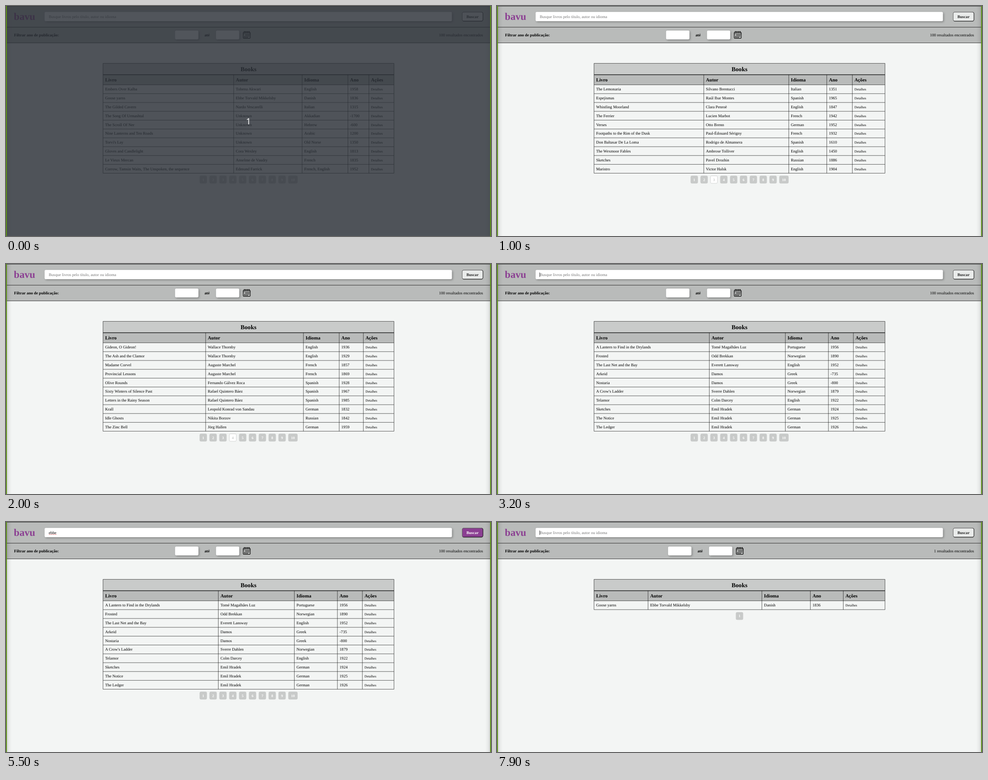
These frames come from a looping animation (1086 by 515 pixels, 8000 ms). An HTML page:

```html
<!DOCTYPE html>
<html lang="pt">
<head>
<meta charset="utf-8">
<title>Books</title>
<style>
  html, body { margin: 0; width: 100%; height: 100%; overflow: hidden; background: #f3f5f4; }
  svg { display: block; width: 1086px; height: 515px; }
  text { font-family: "Liberation Serif", "Times New Roman", serif; text-rendering: geometricPrecision; white-space: pre; }
  .field { fill: #fff; filter: drop-shadow(2.5px 2.5px 2.2px rgba(0, 0, 0, .28)); }
</style>
</head>
<body>
<svg id="stage" viewBox="0 0 1086 515"></svg>
<script>
const LOOP = 8000, TICK = 100;
const EM = 16 * 1086 / 1920;          // body text size on the stage
const ROW = 35 * 1086 / 1920, ROWS_TOP = 176.45;
const LEFT = 217.2, RIGHT = 868.8, PAD = 4.75;
const QUERY = 'ebbe';

// Each page: inner column lines, then rows of title|author|language|year
const pages = [
  { at: 0, cols: [509.8, 663.1, 765.6, 812.6], rows: `Embers Over Kalba|Tobenu Akwari|English|1958
Goose yarns|Ebbe Torvald Mikkelsby|Danish|1836
The Gilded Cavern|Nardo Vescarelli|Italian|1315
The Song Of Urmashtal|Unknown|Akkadian|-1700
The Scroll Of Ner|Unknown|Hebrew|-600
Nine Lanterns and Ten Roads|Unknown|Arabic|1200
Torvi's Lay|Unknown|Old Norse|1350
Gloves and Candlelight|Cora Wexley|English|1813
Le Vieux Mercan|Anselme de Vaudry|French|1835
Corrow, Tamsin Waits, The Unspoken, the sequence|Edmund Farrick|French, English|1952` },
  { at: 700, cols: [463, 653.3, 738.4, 795.7], rows: `The Lemonaria|Silvano Brentucci|Italian|1351
Espejismas|Raúl Ibar Montes|Spanish|1965
Whistling Moorland|Clara Penroë|English|1847
The Ferrier|Lucien Marbot|French|1942
Verses|Otto Brenn|German|1952
Footpaths to the Rim of the Dusk|Paul-Édouard Sérigny|French|1932
Don Baltasar De La Loma|Rodrigo de Almansera|Spanish|1610
The Wexmoor Fables|Ambrose Tolliver|English|1450
Sketches|Pavel Drozhin|Russian|1886
Maristro|Victor Halsk|English|1904` },
  { at: 1600, cols: [447, 640, 734, 795], rows: `Modest Fortunes|Arthur Pellwick|English|1861
Lucas the Doubter|Étienne Rovard|French|1796
Hamburg Lindenhof|Ulrich Dornach|German|1929
Guilt and Winter|Grigori Volnin|Russian|1866
The Hermit of Orsk|Grigori Volnin|Russian|1869
The Restless Ones|Grigori Volnin|Russian|1872
The Sisters Malinova|Grigori Volnin|Russian|1880
Fennimarsh|Georgia Elwin|English|1871
Unseen Neighbour|Randall Eames|English|1952
Calyra|Eurastes|Greek|-431` },
  { at: 2000, cols: [447, 666, 746.1, 800.2], rows: `Gideon, O Gideon!|Wallace Thornby|English|1936
The Ash and the Clamor|Wallace Thornby|English|1929
Madame Corvel|Auguste Marchel|French|1857
Provincial Lessons|Auguste Marchel|French|1869
Olive Rounds|Fernando Gálvez Roca|Spanish|1928
Sixty Winters of Silence Past|Rafael Quintero Báez|Spanish|1967
Letters in the Rainy Season|Rafael Quintero Báez|Spanish|1985
Krall|Leopold Konrad von Sandau|German|1832
Idle Ghosts|Nikita Borzov|Russian|1842
The Zinc Bell|Jörg Hallen|German|1959` },
  { at: 2500, cols: [475.4, 645.7, 742.1, 798], rows: `A Lantern to Find in the Drylands|Tomé Magalhães Luz|Portuguese|1956
Frosted|Odd Brekkan|Norwegian|1890
The Last Net and the Bay|Everett Lansway|English|1952
Arkeid|Damos|Greek|-735
Nostaria|Damos|Greek|-800
A Crow's Ladder|Sverre Dahlen|Norwegian|1879
Telamor|Colm Darcey|English|1922
Sketches|Emil Hradek|German|1924
The Notice|Emil Hradek|German|1925
The Ledger|Emil Hradek|German|1926` },
  { at: 5600, cols: [338.2, 593.1, 701.7, 775.4], rows: `Goose yarns|Ebbe Torvald Mikkelsby|Danish|1836` }
];

// Hover fades: page button -> [in from, in to, out from, out to]
const hovers = { 2: [0, 300, 800, 1000], 3: [800, 1000, 1600, 1800], 4: [1600, 1800, 2100, 2400], 5: [2100, 2400, 2500, 2800] };
const searchHover = [5100, 5400, 6000, 6400];
const caretTimes = [[600, 700], [3200, 3800], [4000, 5000], [7100, 7200], [7900, 8000]];
const keyTimes = [4000, 4100, 4200, 4400];

const ramp = (t, a, b) => Math.min(1, Math.max(0, (t - a) / (b - a)));
const fade = (t, h) => h ? ramp(t, h[0], h[1]) - ramp(t, h[2], h[3]) : 0;
const mix = (a, b, p) => `color-mix(in srgb, ${b} ${p * 100}%, ${a})`;

const rect = (x, y, w, h, fill, extra = '') =>
  `<rect x="${x}" y="${y}" width="${w}" height="${h}" style="fill:${fill}" ${extra}/>`;
const field = (x, y, w, h) => `<rect class="field" x="${x}" y="${y}" width="${w}" height="${h}" rx="2.8"/>`;
const rule = (d, width = .65) => `<path d="${d}" stroke="#000" stroke-width="${width}" fill="none"/>`;

// Text whose line box is centred on cy
function text(x, cy, s, { size = EM, bold = false, fill = '#000', anchor = 'start' } = {}) {
  return `<text x="${x}" y="${cy + size * .3375}" font-size="${size}" font-weight="${bold ? 700 : 400}"
    text-anchor="${anchor}" style="fill:${fill}">${s}</text>`;
}

function calendar(x) {
  let s = `<rect x="${x + 1.1}" y="58.6" width="15.8" height="13.8" rx="1.6" fill="none" stroke="#000" stroke-width="1.2"/>`
    + rule(`M${x + 1} 62.3h16`, .9);
  for (let i = 0; i < 4; i++) s += rect(x + 3 + i * 3.5, 56, 1.5, 4.4, '#000', 'rx=".7"');
  for (let i = 1; i < 11; i++)
    s += rect(x + 3.2 + i % 4 * 3.2, 64.2 + Math.floor(i / 4) * 2.6, 2, 1.5, '#000');
  return s;
}

function searchBar(t) {
  const typed = t >= 7900 ? '' : QUERY.slice(0, keyTimes.filter(k => t >= k).length);
  const selected = t >= 7200 && t < 7900;
  const p = fade(t, searchHover);
  let s = text(17.6, 23.6, 'bavu', { size: EM * 2.5, bold: true, fill: '#8b3f92' }) + field(86.5, 13.2, 912, 20.8);
  if (selected) s += rect(96, 18.5, 17, 10.5, '#4a90d9');
  s += typed
    ? text(95.8, 23.5, typed, { fill: selected ? '#fff' : '#000' })
    : text(95.8, 23.5, 'Busque livros pelo título, autor ou idioma', { fill: '#757575' });
  if (t >= 5500 && t < 7100)
    s += `<path d="M96 27.9H113" stroke="#e33" stroke-width=".9" stroke-dasharray="1.1 .9"/>`;
  if (caretTimes.some(([a, b]) => t >= a && t < b)) s += rect(95.3 + typed.length * 4.27, 19, .9, 10, '#222');
  return s
    + rect(1021.5, 13.6, 46.5, 20.3, mix('#e9ebea', '#8b3f92', p), 'rx="3.6" stroke="url(#bevel)" stroke-width="1.1"')
    + text(1044.6, 23.5, 'Buscar', { bold: true, anchor: 'middle', fill: mix('#222', '#fff', p) });
}

function filterBar(found) {
  const dx = found === 1 ? 4.5 : 0;
  return text(18, 65, 'Filtrar ano de publicação:', { bold: true })
    + field(378.6 + dx, 55, 52.3, 19.8)
    + text(444.5 + dx, 65, 'até', { bold: true })
    + field(470.3 + dx, 55, 52, 19.8)
    + calendar(530 + dx)
    + text(1068, 65, `${found} resultados encontrados`, { anchor: 'end' });
}

function table({ cols, rows }) {
  const lines = rows.split('\n'), w = RIGHT - LEFT;
  const xs = [LEFT, ...cols];
  const bottom = ROWS_TOP + lines.length * ROW;
  let s = rect(LEFT, 128.4, w, 25.4, '#c9cbca') + rect(LEFT, 153.8, w, ROWS_TOP - 153.8, '#b9bbba')
    + text(543, 141, 'Books', { size: EM * 1.5, bold: true, anchor: 'middle' });
  ['Livro', 'Autor', 'Idioma', 'Ano', 'Ações'].forEach((h, i) =>
    s += text(xs[i] + PAD, 165.2, h, { size: EM * 1.2, bold: true }));
  let grid = `M${LEFT} 128.4H${RIGHT}V${bottom}H${LEFT}Z`;
  for (const x of cols) grid += `M${x} 153.8V${bottom}`;
  lines.forEach((line, r) => {
    const cy = 186.3 + r * ROW;
    line.split('|').forEach((cell, i) => s += text(xs[i] + PAD, cy, cell));
    s += text(xs[4] + PAD, cy + .6, 'Detalhes', { size: EM / 1.2 });
    grid += `M${LEFT} ${ROWS_TOP + r * ROW}H${RIGHT}`;
  });
  return s + rule(grid) + rule(`M${LEFT} 153.8H${RIGHT}`, 1.2);
}

function pager(t, count, top) {
  const grey = '#c8cac9', step = 22.06;
  let s = '', x = count > 1 ? 433.5 : 534.8;
  for (let n = 1; n <= count; n++, x += step) {
    const p = fade(t, hovers[n]), w = n > 9 ? 20.9 : 16.4;
    s += rect(x + .4, top + .4, w - .8, 16.7, mix(grey, '#fff', p), `rx="2.6" stroke="${grey}" stroke-width=".8"`)
      + text(x + w / 2, top + 8.8, n, { size: 8.3, bold: true, anchor: 'middle', fill: mix('#fff', grey, p) });
  }
  return s;
}

const defs = `<defs>
  <linearGradient id="bevel" x1="0" y1="0" x2="1" y2="1">
    <stop offset=".45" stop-color="#666"/><stop offset=".55" stop-color="#111"/></linearGradient>
  <linearGradient id="edge"><stop stop-opacity=".13"/><stop offset=".4" stop-opacity=".05"/><stop offset="1" stop-opacity="0"/></linearGradient>
</defs>`;

function scene(t) {
  const page = pages.findLast(p => t >= p.at);
  const found = page.at === 5600 ? 1 : 100;
  const bottom = ROWS_TOP + page.rows.split('\n').length * ROW;
  const edge = rect(2, 0, 11, 515, 'url(#edge)');
  let s = defs + rect(0, 0, 1086, 515, '#f3f5f4') + rect(0, 0, 1086, 82.6, '#b9bbba')
    + rule('M0 .4H1086M0 47.4H1086M0 82.6H1086', .75);
  s += edge + `<g transform="matrix(-1 0 0 1 1086 0)">${edge}</g>`;
  s += searchBar(t) + filterBar(found) + table(page) + pager(t, found === 1 ? 1 : 10, bottom + 5.5);
  if (t < 100)
    s += rect(0, 0, 1086, 515, 'rgba(43,48,56,.82)')
      + `<text x="543" y="264.5" font-size="19" text-anchor="middle" fill="#fff" style="font-family:'Noto Sans','Open Sans',sans-serif">1</text>`;
  return s + rect(0, 0, 2, 515, '#5d9118') + rect(1084, 0, 2, 515, '#5d9118');
}

const stage = document.getElementById('stage');
let shown = -1;
function draw() {
  const t = Math.floor(performance.now() % LOOP / TICK) * TICK;
  if (t !== shown) stage.innerHTML = scene(shown = t);
  requestAnimationFrame(draw);
}
draw();
</script>
</body>
</html>
```
